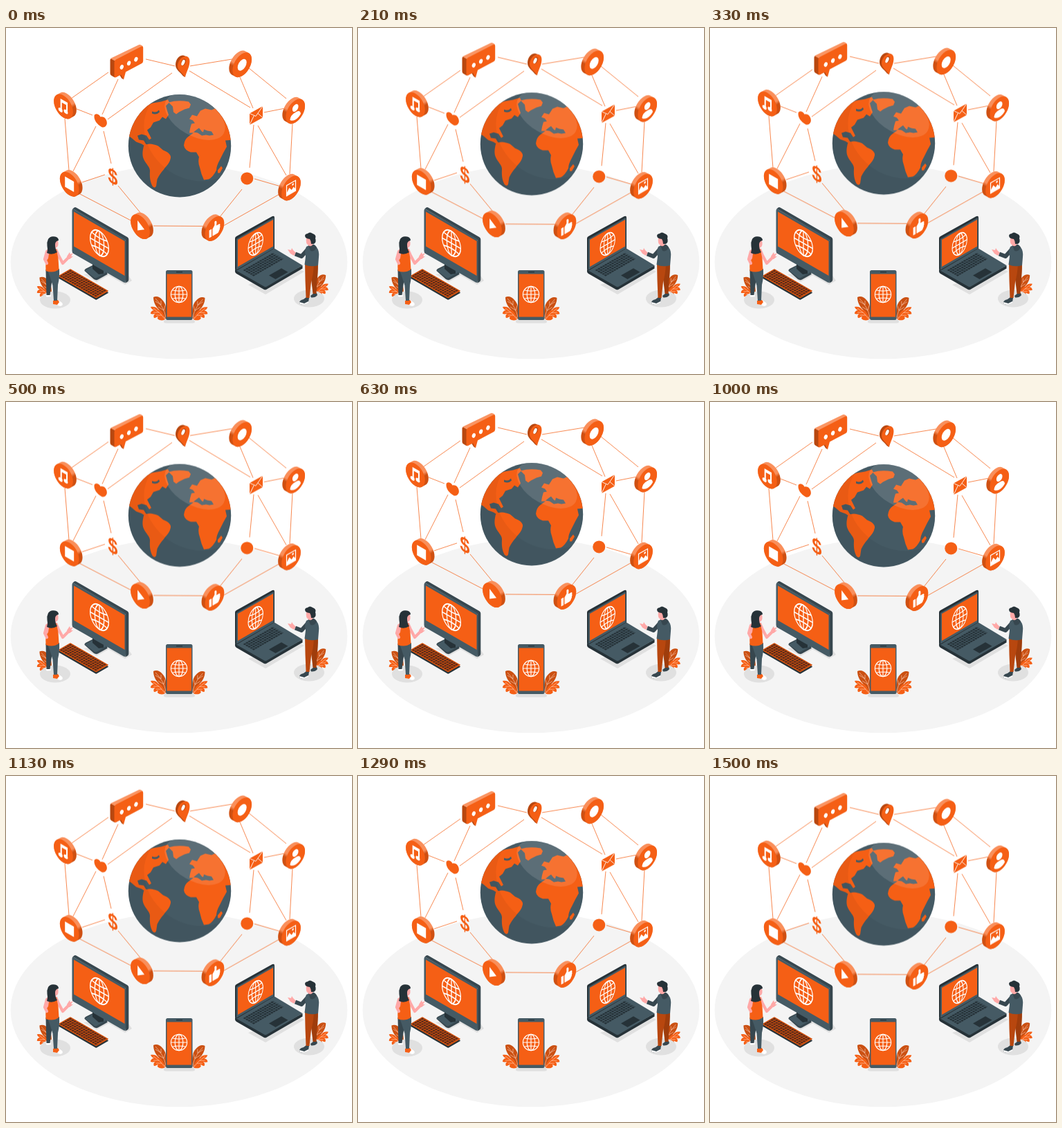
Recreate the animation shown at these times as an HTML page. Size 500 px wide and 500 px high, loop 1540 ms.

```html
<!DOCTYPE html>
<html lang="en">
<head>
<meta charset="utf-8">
<title>Connected world</title>
<style>
  html, body { margin: 0; width: 100%; height: 100%; overflow: hidden; background: #fff; }
  svg { display: block; width: 100vw; height: 100vh; }
  .o { fill: #f55f15; }
  .od { fill: #b8470f; }
  .ol { fill: #fa9563; }
  .g { fill: #455a64; }
  .d { fill: #37474f; }
  .k { fill: #263238; }
  .w { fill: #fff; }
  .s { fill: #e0e0e0; }
  .p { fill: #ffa8a7; }
  .grid, .wire { fill: none; stroke: #fff; stroke-width: 1.4; }
  .thin { stroke-width: .9; }
  .links { fill: none; stroke: #f55f15; stroke-width: .75; }
  .skin { fill: none; stroke: #ffa8a7; stroke-width: 4.2; stroke-linecap: round; stroke-linejoin: round; }
  .cash { font: bold 31px "Liberation Sans", Arial, sans-serif; text-anchor: middle; }
</style>
</head>
<body>
<svg viewBox="0 0 500 500">
  <defs>
    <linearGradient id="rim" gradientUnits="userSpaceOnUse" x1="-14" y1="9" x2="9" y2="-14">
      <stop offset=".3" stop-color="#cf5012"/>
      <stop offset=".42" stop-color="#f98f5b"/>
    </linearGradient>
    <clipPath id="ball"><circle cx="251" cy="170.8" r="74.2"/></clipPath>
    <g id="net" class="grid">
      <circle r="14"/><ellipse rx="7" ry="14"/>
      <path d="M0-14V14M-14 0H14M-11.5-7.5Q0-4.5 11.5-7.5M-11.5 7.5Q0 4.5 11.5 7.5"/>
    </g>
    <g id="plant">
      <path fill="#cb5012" d="M0 0C2-12 1-22-5-28C-9-33-14-34-18-32C-18-25-15-19-10-14C-6-9-2-5 0 0Z"/>
      <path class="o" d="M-1 0C-3-8-6-13-11-14C-13-18-18-19-22-18C-21-15-19-14-17-13C-20-13-22-11-22-8C-19-7-17-8-15-8C-18-7-18-4-17-2C-14-2-13-4-11-4C-13-2-12 0-9 1C-5 2-2 1-1 0Z"/>
      <path fill="none" stroke="#ffd9c4" stroke-width=".6" d="M0-3Q-3-18-15-30M-3-13L-11-18M-7-21L-15-26M-3-13L-1-20M-7-21L-7-27M-2-1Q-7-9-18-16M-6-6L-14-6M-10-10L-18-10"/>
    </g>
  </defs>

  <rect width="500" height="500" class="w"/>
  <ellipse cx="250" cy="338" rx="243.3" ry="140.2" fill="#f4f4f4"/>
  <g id="plants"></g>

  <!-- monitor -->
  <path class="s" d="M146 356L172 371L182 365L177 358ZM112 356L131 367L149 357L146 352Z"/>
  <path class="d" d="M113.500 351Q113 349 116 347.500L127 342L146 352L146.500 356L133 363.500Q130 365 127 363Z"/>
  <path class="g" d="M114 350.500L128 342.500L146 352.500L131 361Q129.500 361.500 128 361Z"/>
  <path class="k" d="M125 336L141 345V355L134 356L125 348Z"/>
  <path class="g" d="M95.500 264Q95.500 261 98 262L171 304Q173 305.500 173 308V365Q173 369 170 367.500L97.500 326Q95.500 325 95.500 322Z"/>
  <path class="d" d="M96 261.500L99 259.300Q100 258.700 101.500 259.500L175.500 302.200Q177.300 303.500 177.300 305.500V364Q177 366.500 175 367.300L172 368.400Q173 367 173 365V308Q173 306 171 304.500L98 262Z"/>
  <path class="o" d="M98 265.500L171.500 308V358L98 315.500Z"/>

  <!-- keyboard -->
  <g id="keys" transform="matrix(.866 .5 -.866 .5 93 348)"></g>

  <!-- laptop -->
  <path class="s" d="M350 371L375 385L431 352L420 347Z"/>
  <path class="k" d="M331 349L375 373L428.500 343V347.500L376 378Q375 378.500 373 378L333 355Q331 353.500 331 352Z"/>
  <path class="g" d="M331 349.500L387 318L428.500 343L377 373.500Q375 374.500 373 373.500Z"/>
  <path class="k" d="M331 304Q331 302 333 301L384 272.500Q388 270.500 388 274V318.500L333.500 350.500Q331 351 331 348Z"/>
  <path class="g" d="M333 305L387 274V318.500L333 349.500Z"/>
  <path class="o" d="M335 306L386 277V315.500L335 345Z"/>
  <g id="pads"></g>
  <path class="k" d="M380 357.500L398 347.300L407.500 352.700L389.500 363Z"/>

  <!-- phone -->
  <path class="s" d="M229 421H271L273 424Q273 426.500 270 426.500H231Q228 426.500 228 424Z"/>
  <rect class="g" x="231" y="350" width="38.500" height="72" rx="2.500"/>
  <rect class="o" x="232.500" y="355.500" width="35.500" height="62"/>
  <path d="M246 352.700H255" stroke="#263238" stroke-width="1.300"/>

  <use href="#net" transform="matrix(.866 .5 0 1 135 311) scale(1.1 1.25)"/>
  <use href="#net" transform="matrix(.866 -.5 0 1 360.700 312) scale(.88 1.08)"/>
  <use href="#net" transform="translate(250 385) scale(.83)"/>

  <!-- woman -->
  <ellipse class="s" cx="71" cy="393" rx="22" ry="12.500"/>
  <path class="w" d="M58 384H64L65 388L59 388.500Q57 387 58 384ZM68 394L75 393L81 397Q83 400 80 401.500Q76 402.500 74 400L68 399Z"/>
  <path class="o" d="M68 394L75 393L77 396L74 400L68 399Z"/>
  <path class="d" d="M57.500 349L68 352L66 368L63.500 386H58.500L58 368Z"/>
  <path class="g" d="M60 350L77 348Q77.500 362 75 371L74 394H69L67.500 372L63 358Z"/>
  <path class="skin" d="M74 325L82 340L91 331"/>
  <path class="p" d="M88 330L92 324L93 327L97 325L94 330L97 330L92 334L89 334Z"/>
  <path class="p" d="M59 320L66 317L74 319L77 326L74 334L58 335Z"/>
  <path class="o" d="M61 333L63 320H73L75.500 333L76.500 349Q68 355 57.500 351Q57 343 58 337Z"/>
  <path class="skin" d="M59 323L56 334L59 340"/>
  <path class="p" d="M68 305Q75 304 75.500 310Q76 317 72 317.500V321H66Z"/>
  <path class="k" d="M61 305Q64 300 71 301.500Q76 302.500 76 307Q71 308 71 313Q71 320 74 324Q66 329 59 325Q61 320 59.500 315Q58.500 310 61 305Z"/>

  <!-- man -->
  <ellipse class="s" cx="438" cy="391" rx="22" ry="12.500"/>
  <path class="d" d="M424 396Q425 393 430 392L434 389L438 390L437 396Q431 400 425 399ZM440 387L445 383H449L450 386Q447 390 441 389.500Z"/>
  <path class="w" d="M424 396L431 398L437 395V397Q431 400 425 399Z"/>
  <path fill="#9f3d0c" d="M439 340H451Q451 356 449.500 365L448.500 384H443.500L441 363Z"/>
  <path class="od" d="M432 340L445 342Q444 357 441 367L438.500 390H433.500L432.500 365Z"/>
  <path class="p" d="M407 320L412 321L413 318L415 321L419 325L416 329L411 326Z"/>
  <path d="M436 320L427 330L418 326.500" fill="none" stroke="#37474f" stroke-width="6" stroke-linejoin="round"/>
  <path class="g" d="M434 316Q442 311 449 317Q453 322 452 331L451 343Q441 346 431.500 342L433 330Q431 322 434 316Z"/>
  <path class="d" d="M437 314Q445 310 449 317Q446 324 440 322Z"/>
  <path class="p" d="M434 303Q433 312 436 313L438 315Q443 316 444 311L444 303Z"/>
  <path class="k" d="M433 303Q430 298 436 297Q439 294 443 297Q449 299 447 304Q449 309 445 312L441 312Q441 308 439 305Q436 305 433 303Z"/>

  <g id="sky">
    <g class="links" id="links"></g>
    <!-- earth -->
    <g clip-path="url(#ball)">
      <circle class="g" cx="251" cy="170.800" r="75"/>
      <g class="o">
        <path d="M174 155C180 134 196 114 212 109L224 107L234 104L236 108L231 113L233 120L235 126L231 132L226 129L222 134L213 137L209 144L204 148L207 154L210 160L207 162L203 156L196 154L190 156L192 162L199 163L202 168L206 171L202 172L196 168L188 165L181 159Z"/>
        <path d="M199 171C205 166 213 168 220 171L227 177C235 180 240 185 237.500 190C236 197 231 200 228 205C224 209 221 214 218.500 219L217 229Q215 233 211.500 229C208 222 207.500 215 208 207C208 201 202 197 199 190C196 183 198 176 199 171Z"/>
        <path d="M235 108Q248 104 264 107L267 111L265 116L258 118L250 122L246 125L242 122L241 114Z"/>
        <path d="M266 146L268 139L273 138L270 134L265 132L269 126L276 128L281 120L288 117L297 119L306 115L330 140V162L317 163L319 172L314 181L309 191Q304 200 304 206Q299 216 293 219L286 220Q282 212 280 202Q277 194 279 187L275 180L267 180Q258 177 257 170Q258 161 264 157L271 152L265 152Z"/>
        <path d="M306 206L311 200L313 203L309 210L306 210Z"/>
      </g>
      <path class="g" d="M271 151L276 147L279 145L283 150L285 151L286 147L291 149L297 150L300 155L294 156L289 155L283 156L277 152ZM211 121Q217 124 221 119L222 122Q217 127 211 124Z"/>
      <ellipse cx="272" cy="153" rx="156" ry="145" transform="rotate(35 272 153)" fill="none" stroke="#000" stroke-width="160" opacity=".05"/>
      <ellipse cx="273" cy="129" rx="48" ry="27" transform="rotate(30 273 129)" fill="#fff" opacity=".12"/>
    </g>

    <!-- speech bubble -->
    <path class="ol" d="M151 44.500L192 24.800Q194 24 198 27L157 49Z"/>
    <path class="od" d="M150.500 47Q150.500 44.500 152 45L157 48V72L152 69Q150.500 68 150.500 66ZM164 68L167 73L170 75L168 67Z"/>
    <path class="o" d="M156.500 50Q156.500 47.500 159 46L195 27.500Q198.200 26 198.200 29V48Q198.200 50.500 196 51.700L173 64L170 75L166 68L159 71.700Q156.500 73 156.500 70Z"/>
    <g class="w" id="dots"></g>

    <!-- map pin -->
    <path class="od" d="M245 54C245 46 250 40 256 40L262 42L259 71.500L256 70C252 64 245 61 245 54Z"/>
    <path class="o" d="M248 56C248 48 254 41 260 41.500C267 42 266 51 264 57L258.500 71.500C255 65 249 63 248 56Z"/>
    <ellipse class="od" cx="256.500" cy="50" rx="3" ry="5.200" transform="rotate(22 256.500 50)"/>
    <ellipse class="w" cx="256" cy="50.500" rx="2.200" ry="4.400" transform="rotate(22 256 50.500)"/>

    <path class="o" d="M127.500 127.500C128 123.500 134 124 136.500 129C142 127.500 146.500 133 145.800 139C145 143 141 145 138 143.500C132 140 127 134 127.500 127.500Z"/>
    <text class="cash o" transform="matrix(.82 .45 0 1 154.300 225.800)">$</text>

    <!-- envelope -->
    <path class="o" d="M352 124L371 113.500V130L352 140.500Z"/>
    <path class="wire thin" d="M352 124L361 128L371 113.500M352 140.500L358.500 127M371 130L364 124"/>
    <circle class="o" cx="348.300" cy="218" r="9"/>
    <g id="discs"></g>
  </g>
</svg>
<script>
const put = (id, html) => { document.getElementById(id).innerHTML = html; };

// Links between the floating icons: x1 y1 x2 y2
put('links', `202 45 244 55,266 55 327 45,240 65 147 132,265 62 353 115,148 64 94 102,162 74 139 125,
102 117 125 126,85 131 91 206,130 142 97 207,141 149 152 196,110 223 143 212,107 240 182 279,
162 228 195 268,213 286 284 286.400,338 71 357 116,351 58 405 102,373 122 401 116.500,358 140 352 202,
364 141 405 213,414 138 410 211,359 218 397 229,341 233 309 273,314 286 399 238`
  .split(',').map(s => {
    const [a, b, c, d] = s.trim().split(' ').map(Number);
    return `<path d="M${a} ${b + .5}L${c} ${d + .5}"/>`;
  }).join(''));

put('dots', [0, 1, 2].map(i => {
  const x = 167.3 + i * 10.3, y = 57 - i * 5.6;
  return `<ellipse cx="${x}" cy="${y}" rx="2.5" ry="3.5" transform="rotate(20 ${x} ${y})"/>`;
}).join(''));

// Isometric badge; side 1 faces left, -1 faces right
const disc = (x, y, side, icon) => `
  <g transform="matrix(${.866 * side} -.5 0 1 ${x} ${y})">
    <path d="M0 0L-5.800 -5.600" stroke="url(#rim)" stroke-width="32" stroke-linecap="round"/>
    <circle r="16" class="o"/>
  </g>
  <g class="w" transform="matrix(.866 ${-.5 * side} 0 1 ${x} ${y})">${icon}</g>`;

const icons = {
  note: '<path d="M-5-9L7-9V5H4.600V-4.500H-2.600V8H-5Z"/><ellipse cx="-5" cy="7.500" rx="3.500" ry="2.900"/><ellipse cx="4" cy="5.500" rx="3.500" ry="2.900"/>',
  square: '<rect x="-7.500" y="-7.500" width="15" height="15"/>',
  play: '<path d="M-4.500-7L7 .5L-4.500 7.500Z"/>',
  thumb: '<path d="M-9-2H-5V9H-9ZM-3.500-1L0-5V-10Q3.500-11 3.500-7L3-3H8Q10-2 9 0Q10 2 8.700 3.500Q9 6 7.500 6.500Q7 9 5 9H-3.500Z"/>',
  dot: '<circle r="7.500"/>',
  user: '<circle cy="-5" r="5"/><path d="M-9 8Q-8 1 0 1.500Q8 1 9 8Q5 12 0 12Q-5 12-9 8Z"/>',
  photo: '<rect class="wire" x="-7.500" y="-7.500" width="15" height="15"/><path d="M-7 7V3L-3-2L1 3L4 0L7 4V7Z"/><circle cx="3" cy="-4" r="1.500"/>'
};
put('discs', [
  [83, 114, -1, 'note'], [91.7, 226.3, -1, 'square'], [194, 287.7, -1, 'play'],
  [301.4, 290.5, 1, 'thumb'], [341.2, 53.8, 1, 'dot'], [418.2, 121, 1, 'user'], [412, 232, 1, 'photo']
].map(([x, y, side, name]) => disc(x, y, side, icons[name])).join(''));

// Five rows of keys
const rows = (y, step, x1, x2, w, color) => [0, 1, 2, 3, 4].map(i =>
  `<path d="M${x1} ${y + i * step}H${x2}" stroke="${color}" stroke-width="${w}" stroke-dasharray="3 .8"/>`).join('');
put('keys', `<rect width="64" height="21" x="2.5" y="2.5" class="k" rx="1"/>
  <rect width="64" height="21" fill="#d9540f" rx="1"/>` + rows(3, 3.7, 1.5, 62.5, 3, '#5a2a18'));
put('pads', `<g transform="matrix(.866 -.5 .866 .5 341 350)">${rows(2.2, 3.7, 1, 51, 2.8, '#263238')}</g>`);

// Plants: x, y, direction, scale
put('plants', [[231, 421, 1, 1], [270, 421, -1, .97], [65, 390, 1, .92], [446, 386, -1, .9]]
  .map(([x, y, dir, s]) =>
    `<use href="#plant" transform="translate(${x} ${y}) scale(${s * dir} ${s})"/>`).join(''));

// Linear float up and down by 10 units, held for each step
const STEPS = 37;
const lift = i => -10 * (1 - Math.abs(2 * ((i + 1) / STEPS % 1) - 1));
document.getElementById('sky').animate(
  Array.from({ length: STEPS + 1 }, (_, i) => ({
    offset: i / STEPS,
    transform: `translateY(${lift(i)}px)`,
    easing: 'steps(1, end)'
  })),
  { duration: 1540, iterations: Infinity });
</script>
</body>
</html>
```
